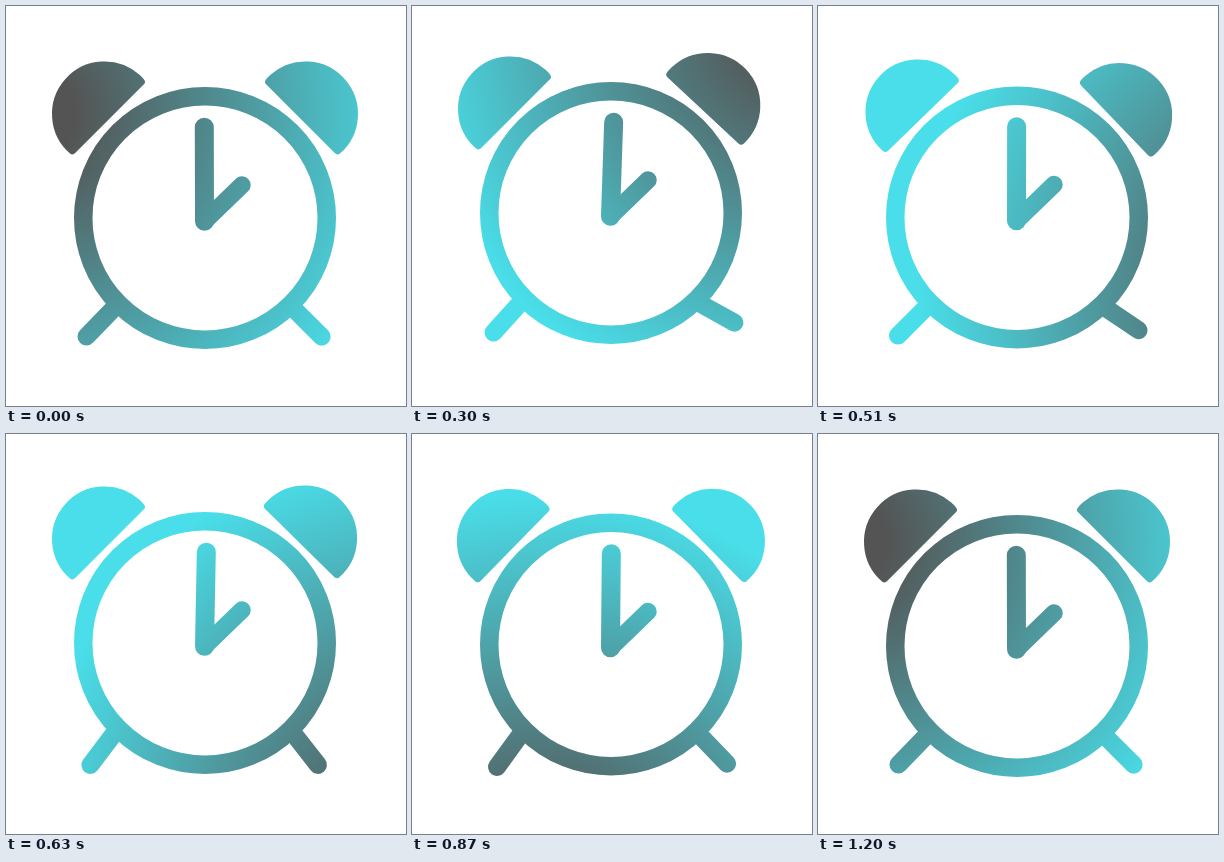
Recreate the animation shown at these times as an HTML page with a canvas. Size 400 px wide and 400 px high, loop 1.23 s.

```html
<!DOCTYPE html>
<html lang="en">
<head>
<meta charset="utf-8">
<title>Alarm clock</title>
<style>
  html, body { margin: 0; width: 100%; height: 100%; overflow: hidden; background: #fff; }
  canvas { display: block; width: 400px; height: 400px; }
</style>
</head>
<body>
<canvas id="stage" width="400" height="400"></canvas>
<script>
const ctx = document.getElementById('stage').getContext('2d');
const STEP = 30, LOOP = 1230, TAU = Math.PI * 2;
const rad = deg => deg * Math.PI / 180;

// Key poses, with a fast rattle between them
const keys = [0, 10, 17, 21, 29, 35, 40];
const tracks = {
  lift:  { pose: [0, 5, 0.5, 3, 1.5, 5, 0], shake: 2 },
  bellL: { pose: [0, 0, 0.8, 0, -0.6, -2, 0], shake: 1 },
  bellR: { pose: [0, -2, 1.2, -0.5, 0.5, 0, 0], shake: -1 },
  legL:  { pose: [0, 2, -1, 7, 8, 12, 0], shake: 5 },
  legR:  { pose: [0, -16, -11, 7, 1, 12.5, 0], shake: -6 }
};

function valueAt({ pose, shake }, step) {
  let i = 0;
  while (i < keys.length - 2 && step >= keys[i + 1]) i++;
  const span = keys[i + 1] - keys[i];
  const u = (step - keys[i]) / span;
  const v = pose[i] + (pose[i + 1] - pose[i]) * u
    + shake * Math.sin(TAU * Math.round(span / 4) * u);
  return Math.min(Math.max(...pose), Math.max(Math.min(...pose), v));
}

function line(x1, y1, x2, y2, width) {
  ctx.lineWidth = width;
  ctx.beginPath();
  ctx.moveTo(x1, y1);
  ctx.lineTo(x2, y2);
  ctx.stroke();
}

// Dome centred on the ring; side is -1 for left, 1 for right
function bell(side, turn) {
  const cut = Math.asin(3 / 48.5);
  ctx.save();
  ctx.translate(199, 212);
  ctx.rotate(rad(turn));
  ctx.scale(-side, 1);
  ctx.beginPath();
  ctx.arc(-100.5, -104.1, 48.5, rad(135) - cut, rad(-45) + cut);
  ctx.closePath();
  ctx.lineWidth = 8;
  ctx.fill();
  ctx.stroke();
  ctx.restore();
}

function leg(side, x, y, length, angle) {
  const a = rad(angle);
  line(x, y, x + side * length * Math.cos(a), y + length * Math.sin(a), 18);
}

// A dark glow circles the clock once per loop
function tint(step) {
  const a = rad(208 + step * 9 + 10 * Math.sin(Math.PI * step / 40));
  const x = 245 + 250 * Math.cos(a), y = 225 + 250 * Math.sin(a);
  const g = ctx.createRadialGradient(x, y, 45, x, y, 390);
  g.addColorStop(0, '#545454');
  g.addColorStop(1, '#49dee9');
  return g;
}

function draw(step) {
  const p = {};
  for (const name in tracks) p[name] = valueAt(tracks[name], step);

  ctx.globalCompositeOperation = 'source-over';
  ctx.clearRect(0, 0, 400, 400);
  ctx.fillStyle = ctx.strokeStyle = '#000';
  ctx.lineCap = ctx.lineJoin = 'round';

  ctx.save();
  ctx.translate(0, -p.lift);
  ctx.lineWidth = 18.5;
  ctx.beginPath();
  ctx.arc(199, 212, 121.75, 0, TAU);
  ctx.stroke();
  bell(-1, p.bellL);
  bell(1, p.bellR);
  leg(-1, 110, 300, 42.5, 46 + p.legL);
  leg(1, 287, 302, 40.5, 45 + p.legR);
  line(198.5, 215.3, 198.3 + p.lift * 0.67, 121.2, 19);
  line(198.5, 215.3, 236, 179, 17.5);
  ctx.restore();

  ctx.globalCompositeOperation = 'source-in';
  ctx.fillStyle = tint(step);
  ctx.fillRect(0, 0, 400, 400);
  ctx.globalCompositeOperation = 'destination-over';
  ctx.fillStyle = '#fff';
  ctx.fillRect(0, 0, 400, 400);
}

const start = performance.now();
function tick() {
  draw(Math.floor((performance.now() - start) % LOOP / STEP));
  requestAnimationFrame(tick);
}
tick();
</script>
</body>
</html>
```
